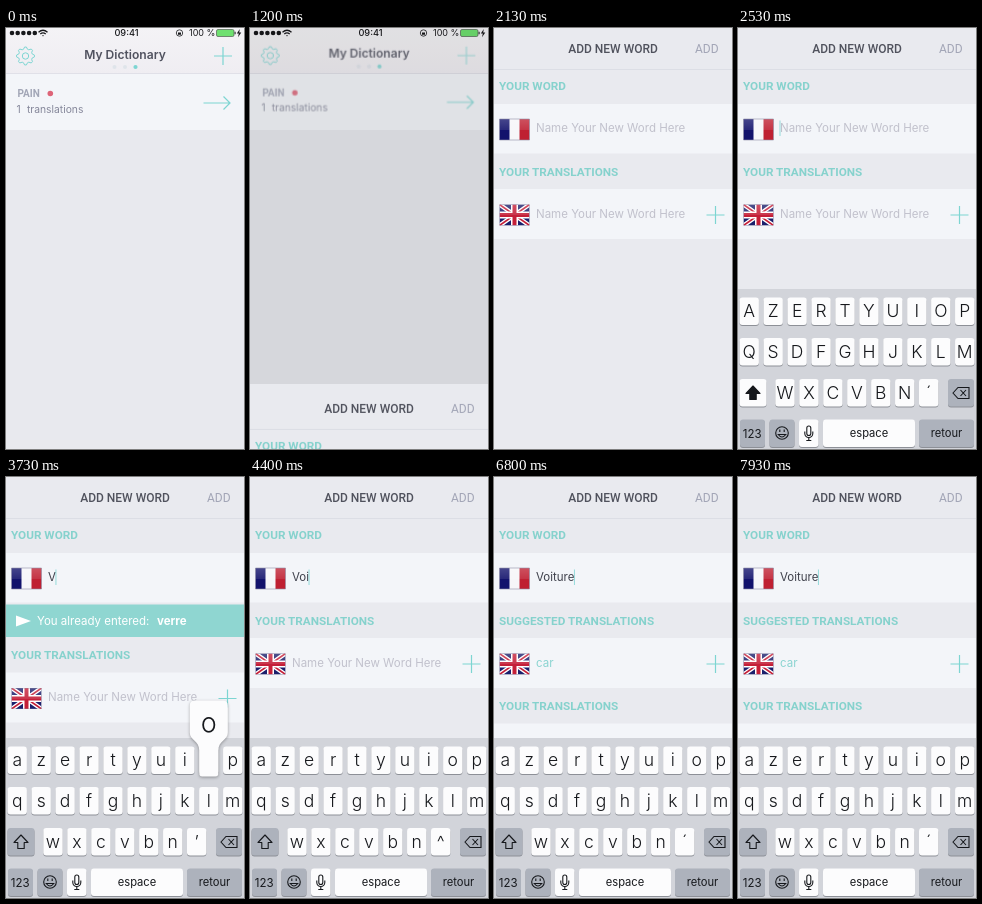
Animation of 238 by 421 pixels, one loop 8000 ms. Source, as an HTML page:

```html
<!DOCTYPE html>
<html lang="en">
<head>
<meta charset="utf-8">
<title>Dictionary: add new word</title>
<style>
  html, body { margin: 0; width: 100%; height: 100%; overflow: hidden; background: #e8e9ee; }
  svg { display: block; width: 100vw; height: 100vh; }
  text { font-family: Inter, "Noto Sans", sans-serif; font-size: 11.5px; }
  .mid { text-anchor: middle; }
  .label { font: 600 11.75px Roboto, "Open Sans", sans-serif; fill: #86d2cd; }
  .hint { fill: #c1c1cc; }
  .row { fill: #f3f5f9; }
  .line { fill: none; stroke: #7dd5d2; stroke-width: 1.2; }
  .ink { fill: none; stroke: #16181c; stroke-width: 1.1; }

  #home, #dim, #plus, #sheet, #keyboard, #below, #banner, #suggest {
    animation: 8s linear infinite;
  }
  #home { animation-name: recede; transform-origin: 119px 0; }
  #dim { animation-name: dim; }
  #plus { animation-name: press; }
  #sheet { animation-name: rise; }
  #keyboard { animation-name: keys; }
  #below { animation-name: push; }
  #banner { animation-name: banner; }
  #suggest { animation-name: suggest; }

  @keyframes recede {
    0%, 14% { transform: none; opacity: 1; }
    15% { transform: translateY(-.3px) scale(.993); opacity: .85; }
    20.6%, 100% { transform: translateY(-2px) scale(.95); opacity: .8; }
  }
  @keyframes dim {
    0%, 14% { opacity: 0; }
    15% { opacity: .07; }
    20.6%, 100% { opacity: .4; }
  }
  @keyframes press {
    0%, 12.5% { opacity: 1; }
    13.5%, 100% { opacity: .75; }
  }
  @keyframes rise {
    0%, 14% { transform: translateY(424px); }
    15% { transform: translateY(361.5px); animation-timing-function: cubic-bezier(.3, .6, .3, 1); }
    20.6%, 100% { transform: none; }
  }
  @keyframes keys {
    0%, 27.8% { transform: translateY(162px); animation-timing-function: cubic-bezier(.2, .7, .3, 1); }
    31.3%, 100% { transform: none; }
  }
  @keyframes push {
    0%, 41.6% { transform: none; animation-timing-function: ease-out; }
    44.8%, 49.6% { transform: translateY(34.5px); animation-timing-function: ease-out; }
    52.5%, 56.2% { transform: none; animation-timing-function: ease-out; }
    59.2%, 100% { transform: translateY(85.5px); }
  }
  @keyframes banner {
    0% { visibility: hidden; animation-timing-function: step-end; }
    41.6% { visibility: visible; animation-timing-function: step-end; }
    52.5%, 100% { visibility: hidden; }
  }
  @keyframes suggest {
    0% { visibility: hidden; animation-timing-function: step-end; }
    56.2%, 100% { visibility: visible; }
  }
</style>
</head>
<body>
<svg viewBox="0 0 238 421" preserveAspectRatio="none">
  <defs>
    <linearGradient id="gloss" x2="0" y2="1">
      <stop offset="0" stop-color="#fff" stop-opacity=".22"/>
      <stop offset=".5" stop-color="#fff" stop-opacity=".1"/>
      <stop offset=".52" stop-color="#fff" stop-opacity="0"/>
    </linearGradient>
    <linearGradient id="bar" x2="0" y2="1">
      <stop offset="0" stop-color="#f4f3f6"/>
      <stop offset="1" stop-color="#efedf2"/>
    </linearGradient>
    <clipPath id="edge"><rect width="30" height="21"/></clipPath>
    <path id="shine" fill="url(#gloss)" stroke="#8f8fa6" stroke-width=".6" d="M0 0h30v21H0z"/>
    <g id="french">
      <path fill="#f6f6f9" d="M0 0h30v21H0z"/>
      <path fill="#12126c" d="M0 0h10v21H0z"/>
      <path fill="#bf2032" d="M20 0h10v21H20z"/>
      <use href="#shine"/>
    </g>
    <g id="british" clip-path="url(#edge)">
      <path fill="#1b1f6c" d="M0 0h30v21H0z"/>
      <path stroke="#fff" stroke-width="4.4" d="M0 0l30 21M30 0L0 21"/>
      <path stroke="#c41f38" stroke-width="1.6" d="M0 0l30 21M30 0L0 21"/>
      <path stroke="#fff" stroke-width="7" d="M15 0v21M0 10.5h30"/>
      <path stroke="#c41f38" stroke-width="4" d="M15 0v21M0 10.5h30"/>
      <use href="#shine"/>
    </g>
    <path id="cross" class="line" d="M-9 0H9M0-9V9"/>
    <path id="bubble" fill="#fcfcfd" d="M-14-46h28q5 0 5 5v27c0 8-9.500 8-9.500 18v23q0 3-3 3h-13q-3 0-3-3v-23c0-10-9.500-10-9.500-18v-27q0-5 5-5z"/>
  </defs>

  <path fill="#e8e9ee" d="M0 0h238v421H0z"/>
  <path fill="url(#bar)" d="M0 0h238v46H0z"/>
  <path class="row" d="M0 46h238v56H0z"/>
  <path fill="#dbdce4" d="M0 45h238v.8H0z"/>

  <g id="home">
    <path id="gear" class="line" style="stroke-width:1"/>
    <circle class="line" style="stroke-width:1" cx="19.500" cy="28" r="3.2"/>
    <text class="mid" x="119" y="30.500" style="font-size:12.1px;font-weight:600" fill="#50525f">My Dictionary</text>
    <g fill="#dfe4ea">
      <circle cx="108.500" cy="39" r="2"/>
      <circle cx="119" cy="39" r="2"/>
      <circle cx="129.500" cy="39" r="2.100" fill="#7dd5d2"/>
    </g>
    <g id="plus"><use href="#cross" x="217" y="28"/></g>
    <text x="11.500" y="68.800" style="font:700 10px Roboto,sans-serif" fill="#a2a6b6">PAIN</text>
    <circle cx="44.300" cy="65.500" r="2.800" fill="#dd6478"/>
    <text x="10.500" y="84.500" style="font-size:10.3px" fill="#85879a">1</text>
    <text x="21" y="84.500" style="font-size:10.3px" fill="#85879a">translations</text>
    <path class="line" d="M197.500 75H224M217.500 68.500l6.500 6.500-6.500 6.500"/>
  </g>

  <g id="status" fill="#17181b">
    <path stroke="#17181b" stroke-width="4.600" stroke-linecap="round" stroke-dasharray="0 5.700" d="M6 5H29"/>
    <g fill="none" stroke="#17181b" stroke-width="1.300">
      <path d="M32.500 4.200q4.500-4 9 0M34.300 6q2.700-2.300 5.400 0"/>
      <circle cx="173.500" cy="5" r="3.200" stroke-width=".8"/>
    </g>
    <path d="M36 7.200h2L37 8.500zM172 4.500h3v2.300h-3z"/>
    <text class="mid" x="120.500" y="8.200" style="font-size:9.200px;font-weight:500">09:41</text>
    <text x="183" y="8.200" style="font-size:9px">100 %</text>
    <rect x="210.500" y="1.500" width="17.500" height="7" rx="1.500" fill="#6fe070" stroke="#444" stroke-width=".6"/>
    <path d="M228.600 3.800h1v2.500h-1zM233.800 1l-3 4.500h2l-.8 3.700 3.300-4.700h-2.100z"/>
  </g>
  <path id="dim" d="M0 0h238v421H0z"/>

  <g id="sheet">
    <path fill="#e9eaef" d="M0-4h238v430H0z"/>
    <path fill="#dcdee5" d="M0 41h238v.9H0z"/>
    <text class="mid" x="119" y="25.300" style="font:500 12px Roboto,sans-serif" fill="#50525d">ADD NEW WORD</text>
    <text x="201" y="25.300" style="font:400 12px Roboto,sans-serif" fill="#a3a6b7">ADD</text>
    <text class="label" x="5" y="62.300">YOUR WORD</text>
    <path class="row" d="M0 76h238v49.500H0z"/>
    <use href="#french" x="5.500" y="91"/>
    <text id="word" x="42" y="104.300"></text>
    <path id="caret" fill="#6ccfcd" d="M0 92.500h1v15.500H0z"/>

    <g id="banner">
      <path fill="#8fd6d1" d="M0 127.500h238v32.500H0z"/>
      <path fill="#fff" d="M10 138.500l15 5.500-15 5.500z"/>
      <text x="31" y="147.500" fill="#fff">You already entered:</text>
      <text x="151" y="147.500" fill="#fff" font-weight="700">verre</text>
    </g>
    <g id="suggest">
      <text class="label" x="5" y="147.600">SUGGESTED TRANSLATIONS</text>
      <path class="row" d="M0 161h238v50H0z"/>
      <use href="#british" x="5.500" y="176.500"/>
      <text x="42" y="190" fill="#8bd4d1">car</text>
      <use href="#cross" x="221.500" y="187"/>
    </g>
    <g id="below">
      <path fill="#e9eaef" d="M0 126h238v310H0z"/>
      <text class="label" x="5" y="147.600">YOUR TRANSLATIONS</text>
      <path class="row" d="M0 161h238v50H0z"/>
      <use href="#british" x="5.500" y="176.500"/>
      <text class="hint" x="42" y="189.500">Name Your New Word Here</text>
      <use href="#cross" x="221.500" y="187"/>
    </g>

    <g id="keyboard">
      <path fill="#d2d4da" d="M0 261h238v163H0z"/>
    </g>
  </g>
</svg>

<script>
  const LOOP = 8000, FOCUS = 2270;
  const $ = id => document.getElementById(id);
  const board = $('keyboard');

  function add(tag, attrs, text = '', parent = board) {
    const el = document.createElementNS('http://www.w3.org/2000/svg', tag);
    for (const name in attrs) el.setAttribute(name, attrs[name]);
    el.textContent = text;
    return parent.appendChild(el);
  }

  const WHITE = '#fcfcfd', GRAY = '#adb2bc', INK = '#16181c';

  function key(x, y, w, fill = WHITE) {
    add('rect', { x, y: y + 1, width: w, height: 27.5, rx: 3, fill: '#8d9097' });
    return add('rect', { x, y, width: w, height: 27.5, rx: 3, fill });
  }

  const glyph = (x, y, size, text, weight = 400) =>
    add('text', { class: 'mid', x, y, style: `font-size:${size}px;font-weight:${weight}`, fill: INK }, text);

  // Letter keys
  const PITCH = 23.95;
  const letters = {};
  [['azertyuiop', 11.2, 269.5], ['qsdfghjklm', 11.2, 310], ['wxcvbn´', 47, 351]].forEach(([row, left, y]) => {
    [...row].forEach((char, i) => {
      const x = left + i * PITCH;
      key(x - 9.7, y, 19.4);
      letters[char] = { x, y, label: glyph(x, y + 19.5, 17.5, char, 300) };
    });
  });

  // Function keys
  const shift = key(1.5, 351, 27, GRAY);
  const arrow = add('path', { class: 'ink', 'stroke-linejoin': 'round', d: 'M15 358l7 7.500h-3.800v6h-6.400v-6H8z' });
  key(210, 351, 26, GRAY);
  add('path', { class: 'ink', d: 'M215 365l5-5.500h11v11h-11zM222.500 362l5.500 6M228 362l-5.500 6' });
  key(2, 391.5, 25, GRAY);
  glyph(14.2, 409.8, 11.5, '123');
  key(31.5, 391.5, 25, GRAY);
  add('circle', { class: 'ink', cx: 44, cy: 405, r: 6.3 });
  add('path', { class: 'ink', d: 'M40.200 406.500q3.800 5 7.600 0zM41.800 401.500v2.500M46.200 401.500v2.500' });
  key(61, 391.5, 19.5);
  add('path', { class: 'ink', d: 'M66.800 403.500v2a4 4 0 0 0 8 0v-2M70.800 409.500v3M68.300 412.500h5' });
  add('rect', { class: 'ink', x: 68.8, y: 398, width: 4, height: 9.5, rx: 2 });
  key(85, 391.5, 92);
  glyph(131, 409, 11.2, 'espace');
  key(181, 391.5, 55, GRAY);
  glyph(208.5, 409, 11.2, 'retour');

  const pop = add('g', {});
  add('use', { href: '#bubble', style: 'filter:drop-shadow(0 1px 1.5px #0005)' }, '', pop);
  const popChar = add('text', { class: 'mid', y: -14.5, style: 'font-size:27px;font-weight:300', fill: INK }, '', pop);

  // Gear outline: eight flat teeth
  const teeth = Array.from({ length: 32 }, (_, i) => {
    const r = i % 4 < 2 ? 9 : 7, a = (i - 0.5) * Math.PI / 16;
    return `${19.5 + r * Math.cos(a)} ${28 + r * Math.sin(a)}`;
  });
  $('gear').setAttribute('d', `M${teeth.join('L')}Z`);

  // Each press: letter, touch time, release time
  const presses = [
    ['V', 3130, 3230], ['o', 3670, 3830], ['i', 4270, 4400], ['t', 4950, 5070],
    ['u', 5480, 5600], ['r', 6070, 6200], ['e', 6670, 6800]
  ];
  const accentAfter = char => !char || char === 'e' ? '´' : 'oiu'.includes(char) ? '^' : '’';

  function draw(t) {
    const typed = presses.filter(p => t >= p[2]);
    const text = typed.map(p => p[0]).join('');
    const upper = !text;
    const word = $('word'), caret = $('caret');

    word.textContent = text || 'Name Your New Word Here';
    word.setAttribute('fill', text ? '#3f414c' : '#c1c1cc');
    const end = text ? word.getComputedTextLength() - 0.5 : -0.5;
    caret.setAttribute('transform', `translate(${42 + end})`);
    const since = t - (text ? typed[typed.length - 1][2] : FOCUS);
    caret.setAttribute('opacity', since >= 0 && since % 1000 < 600 ? 0.7 : 0);

    for (const char in letters) {
      letters[char].label.textContent = upper ? char.toUpperCase() : char;
    }
    letters['´'].label.textContent = accentAfter(text.slice(-1));
    shift.setAttribute('fill', upper ? WHITE : GRAY);
    arrow.style.fill = upper ? INK : 'none';

    const held = presses.find(p => t >= p[1] && t < p[2]);
    pop.setAttribute('visibility', held ? 'visible' : 'hidden');
    if (held) {
      const { x, y } = letters[held[0].toLowerCase()];
      pop.setAttribute('transform', `translate(${x} ${y})`);
      popChar.textContent = held[0];
    }
  }

  let start;
  function tick(now) {
    start ??= now;
    draw((now - start) % LOOP);
    requestAnimationFrame(tick);
  }
  draw(0);
  requestAnimationFrame(tick);
</script>
</body>
</html>
```
